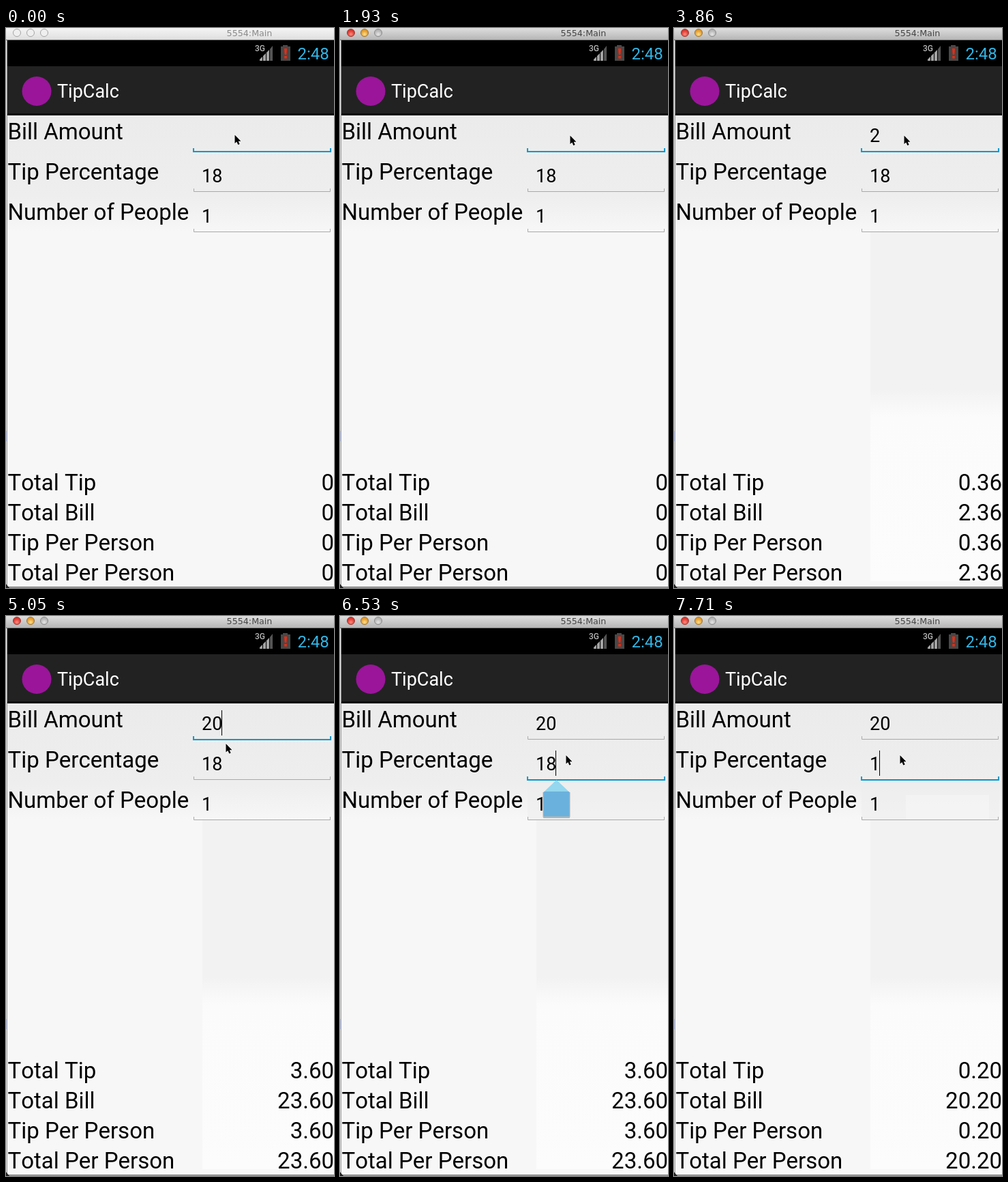
Animation, 481 px wide and 820 px high, one loop 8 s. Source, as an HTML page:

```html
<!DOCTYPE html>
<html lang="en">
<head>
<meta charset="utf-8">
<title>Tip calculator</title>
<style>
  html, body { margin: 0; width: 100%; height: 100%; overflow: hidden; background: #f7f7f7; }
  svg { display: block; width: 481px; height: 820px; }
  text { font-family: Roboto, sans-serif; font-kerning: none; white-space: pre; }
  .label { font-size: 33px; }
  .value { font-size: 33px; text-anchor: end; }
  .input { font-size: 27px; }
  .line { fill: none; stroke: #a9a9a9; stroke-width: 1; }
  .line.focus { stroke: #0099cc; stroke-width: 2; }
</style>
</head>
<body>
<svg viewBox="0 0 481 820">
  <defs>
    <linearGradient id="page" x1="0" y1="128" x2="0" y2="298" gradientUnits="userSpaceOnUse">
      <stop offset="0" stop-color="#ebebeb"/>
      <stop offset=".7" stop-color="#eeeeee"/>
      <stop offset="1" stop-color="#f7f7f7"/>
    </linearGradient>
    <linearGradient id="pane" x1="0" y1="298" x2="0" y2="810" gradientUnits="userSpaceOnUse">
      <stop offset="0" stop-color="#f2f2f2"/>
      <stop offset=".45" stop-color="#f2f2f2"/>
      <stop offset=".53" stop-color="#fbfbfb"/>
      <stop offset="1" stop-color="#fcfcfc"/>
    </linearGradient>
    <linearGradient id="barIdle" x2="0" y2="1">
      <stop stop-color="#f4f4f4"/><stop offset="1" stop-color="#dedede"/>
    </linearGradient>
    <linearGradient id="barActive" x2="0" y2="1">
      <stop stop-color="#dedede"/><stop offset="1" stop-color="#b4b4b4"/>
    </linearGradient>
    <radialGradient id="red" cy=".7"><stop stop-color="#ff8a7c"/><stop offset="1" stop-color="#d8372f"/></radialGradient>
    <radialGradient id="amber" cy=".7"><stop stop-color="#ffe08a"/><stop offset="1" stop-color="#e0992c"/></radialGradient>
    <radialGradient id="grey" cy=".7"><stop stop-color="#e6e6e6"/><stop offset="1" stop-color="#b5b5b5"/></radialGradient>
  </defs>

  <rect width="481" height="820" fill="#f7f7f7"/>
  <rect y="128" width="481" height="170" fill="url(#page)"/>
  <rect id="panel" x="288" y="298" width="193" height="512" fill="url(#pane)"/>
  <rect id="repaint" x="275" y="247" width="202" height="51" fill="#efefef" opacity=".6"/>
  <rect id="patch" x="340" y="262" width="122" height="35" fill="#f7f7f7" opacity=".6"/>

  <!-- window title bar -->
  <rect id="bar" width="481" height="18"/>
  <rect y="17" width="481" height="1" fill="#777"/>
  <g id="idle" fill="#efefef" stroke="#a5a5a5">
    <circle cx="16" cy="7" r="5.5"/><circle cx="36" cy="7" r="5.5"/><circle cx="56" cy="7" r="5.5"/>
  </g>
  <g id="active" stroke-width=".9">
    <circle cx="16" cy="7" r="5.5" fill="url(#red)" stroke="#94352f"/>
    <circle cx="36" cy="7" r="5.5" fill="url(#amber)" stroke="#976b2b"/>
    <circle cx="56" cy="7" r="5.5" fill="url(#grey)" stroke="#858585"/>
  </g>
  <text id="caption" x="357" y="12" text-anchor="middle" style="font:12.7px 'DejaVu Sans',sans-serif">5554:Main</text>

  <!-- status bar -->
  <rect y="18" width="481" height="38" fill="#000"/>
  <text x="365" y="34" font-size="12" font-weight="500" fill="#b8b8b8">3G</text>
  <path d="M372 48V46L376 42V48zM377 48V41L381 37V48zM382 48V36L386 32V48z" fill="#a4a4a4"/>
  <path d="M387 48V31L391 26V48z" fill="#555"/>
  <path d="M406 25h7v2h4v21h-14v-21h3z" fill="#484848"/>
  <path d="M408 30h4l-.7 9h-2.6zM408.2 41h3.6v3.4h-3.6z" fill="#f5280f"/>
  <text x="427.500" y="46" font-size="24" fill="#33b5e5">2:48</text>

  <!-- action bar -->
  <rect y="56" width="481" height="70" fill="#222"/>
  <rect y="125" width="481" height="3" fill="#080808"/>
  <circle cx="45" cy="92.500" r="21.500" fill="#9a159a"/>
  <text x="75" y="102" font-size="27" fill="#fff">TipCalc</text>

  <g id="form"></g>
  <g id="handle">
    <path d="M297.500 258h40v36l-1 2h-38l-1-2z" fill="#000" opacity=".25"/>
    <path d="M317.500 240L336.500 258H298.500z" fill="#94d7ee"/>
    <rect x="298.500" y="257" width="38" height="36.500" rx="1.500" fill="#6bb1dd"/>
  </g>
  <rect id="caret" width="1" height="37"/>

  <!-- window edges -->
  <rect y="18" width="1" height="802" fill="#e6e6e6"/>
  <rect x="1" y="18" width="1" height="801" fill="#9a9a9a"/>
  <rect x="1" y="818" width="480" height="1" fill="#6a6a6a"/>
  <rect x="1" y="819" width="480" height="1" fill="#b0b0b0"/>
  <rect y="590" width="1" height="15" fill="#c3cdf0"/>
  <path d="M0 814l5 6H0z" fill="#222"/>

  <path id="pointer" d="M0 0V12.500L2.800 10L4.800 14.500L7.200 13.500L5.200 9.200H9z" stroke="#fff" stroke-width="1.200" paint-order="stroke"/>
</svg>
<script>
const LOOP = 8000;
const $ = id => document.getElementById(id);

// Each track lists [start time, value]; values hold until the next entry.
const tracks = {
  active: [[0, false], [440, true]],
  bill: [[0, ''], [3410, '2'], [4010, '20']],
  tip: [[0, '18'], [7570, '1']],
  focus: [[0, 0], [6530, 1]],
  handle: [[0, false], [6530, true], [7570, false]],
  caret: [[0, false], [590, true], [890, false], [1480, true], [1930, false],
    [2370, true], [2970, false], [3410, true], [3860, false], [4010, true], [4450, false],
    [4900, true], [5340, false], [5940, true], [6980, false], [7420, true]],
  pointer: [[0, [335.5, 156.5]], [440, [337.5, 157.5]], [4900, [331, 172]], [5050, [322.5, 187]],
    [5190, [320, 201]], [5340, [321, 220]], [5490, [324, 234]], [5640, [325, 230]],
    [5790, [322, 219]], [5940, [320.5, 209]], [6090, [331.5, 204]]]
};

const at = (name, t) => tracks[name].findLast(([start]) => start <= t)[1];

function add(tag, attrs, text = '') {
  const el = document.createElementNS('http://www.w3.org/2000/svg', tag);
  for (const key in attrs) el.setAttribute(key, attrs[key]);
  el.textContent = text;
  return $('form').appendChild(el);
}

const fields = ['Bill Amount', 'Tip Percentage', 'Number of People'].map((name, i) => {
  const y = 59 * i;
  add('text', { class: 'label', x: 2.5, y: 163 + y }, name);
  return {
    y,
    line: add('path', { class: 'line' }),
    input: add('text', { class: 'input', x: 287, y: 167 + y })
  };
});

const totals = ['Total Tip', 'Total Bill', 'Tip Per Person', 'Total Per Person'].map((name, i) => {
  const y = 677 + 44 * i;
  add('text', { class: 'label', x: 2.5, y }, name);
  return add('text', { class: 'value', x: 481, y });
});

const show = (id, on) => $(id).setAttribute('visibility', on ? 'visible' : 'hidden');

function draw(t) {
  const active = at('active', t), focus = at('focus', t);
  const texts = [at('bill', t), at('tip', t), '1'];

  show('active', active);
  show('idle', !active);
  $('bar').setAttribute('fill', active ? 'url(#barActive)' : 'url(#barIdle)');
  $('caption').setAttribute('fill', active ? '#444' : '#8a8a8a');

  fields.forEach(({ y, line, input }, i) => {
    const on = i === focus;
    input.textContent = texts[i];
    line.setAttribute('class', on ? 'line focus' : 'line');
    line.setAttribute('d', on
      ? `M275 ${176 + y}V${181 + y}H476V${176 + y}`
      : `M275.5 ${176 + y}V${180.5 + y}H475.5V${176 + y}`);
  });

  const bill = +texts[0], tip = bill * texts[1] / 100;
  [tip, bill + tip, tip, bill + tip].forEach((sum, i) => {
    totals[i].textContent = bill ? sum.toFixed(2) : '0';
  });

  $('caret').setAttribute('x', [287, 301, 316][texts[focus].length]);
  $('caret').setAttribute('y', 138 + fields[focus].y);
  show('caret', at('caret', t));
  show('handle', at('handle', t));
  show('panel', bill > 0);
  show('repaint', focus === 1);
  show('patch', texts[1] === '1');
  $('pointer').setAttribute('transform', `translate(${at('pointer', t)})`);
}

function tick() {
  draw(performance.now() % LOOP);
  requestAnimationFrame(tick);
}
tick();
</script>
</body>
</html>
```
